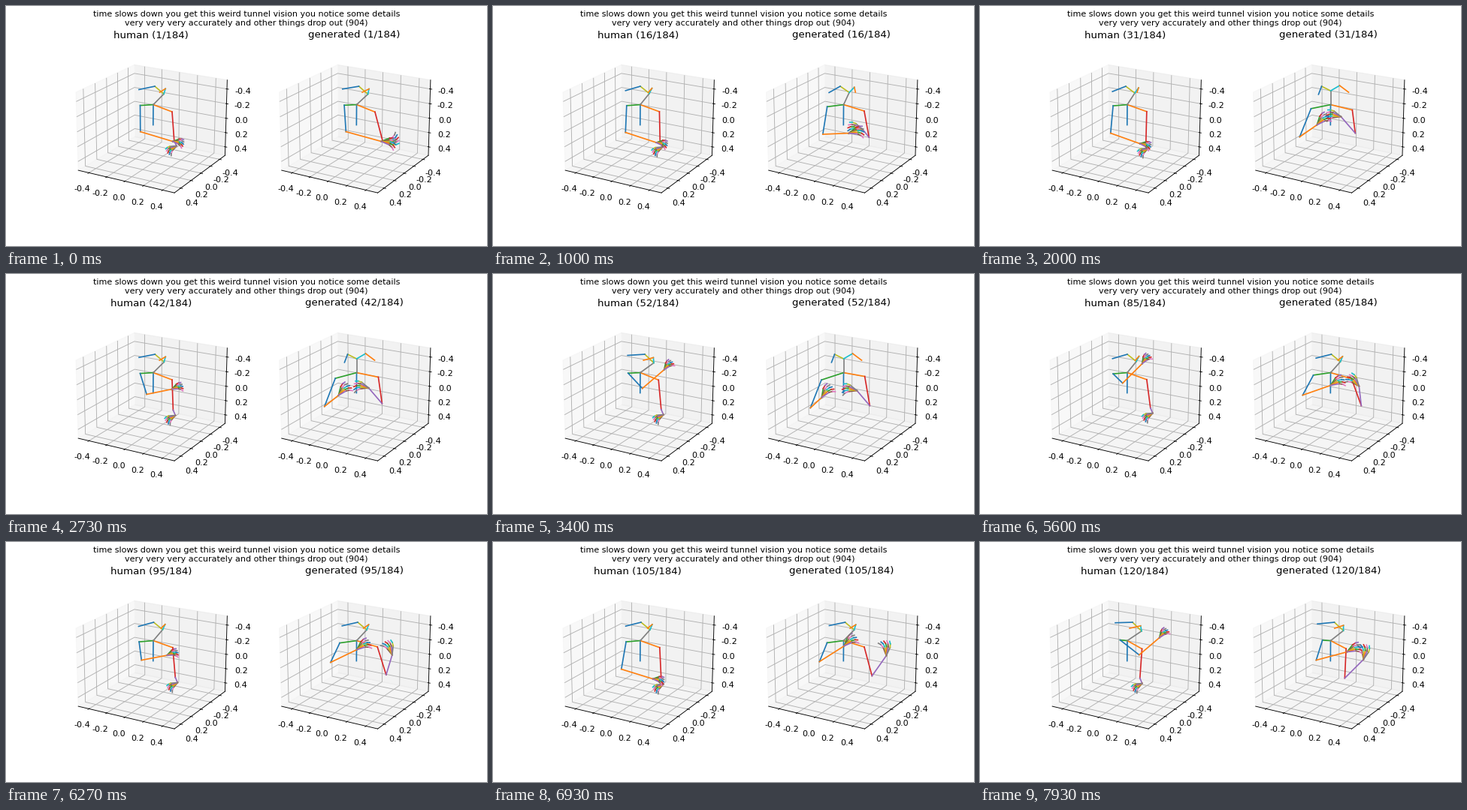
A matplotlib script for the animation above (8000 ms loop, 640 px wide and 320 px high).

```python
import numpy as np
import matplotlib.pyplot as plt
from matplotlib.animation import FuncAnimation

plt.rcParams["axes.unicode_minus"] = False

FRAMES, INTERVAL, TOTAL = 120, 66.6, 184   # about 15 fps, 8 s
ELEV, AZIM = 20, -60
LIM = 0.5 * 25 / 24
PX_PER_UNIT = 121.87                       # stage pixels per world unit in the view plane
WORLD = np.array([8 / 7, -8 / 7, -6 / 7])  # data to world scale, y and z flipped
KEYS = [0, 30, 51, 68, 84, 104, 119]       # frames at which a gesture is held
NECK = 0.2 - 27j


def hand_bones(wrist, first):
    """Five fingers of three bones each."""
    bones = []
    for j in range(first, first + 15, 3):
        bones += [(wrist, j), (j, j + 1), (j + 1, j + 2)]
    return bones


BONES = ([(0, 1), (1, 2), (1, 3), (2, 4), (4, 6)] + hand_bones(6, 8)
         + [(3, 5), (5, 7)] + hand_bones(7, 23)
         + [(1, 38), (38, 39), (38, 40), (39, 41), (40, 42)])
START, END = np.array(BONES).T

# One value per gesture: torso turn, head look, and arm joints as
# pixel offsets x + yj from the pelvis.
HUMAN = dict(
    turn=[0.53, 0.47, 0.58, 0.4, 0.47, 0.47, 0.83],
    look=[14, 10, 18, 6, 12, 13, 19],
    elbow_l=[-17 + 9j, -22 + 11j, 3 - 6j, -27 + 13j, -6 - 13j, -25 + 11j, 16 - 8j],
    wrist_l=[26 + 22j, 17 + 25j, 32 - 31j, 15 + 24j, 20 - 39j, 17 + 24j, 43 - 31j],
    elbow_r=[28 + 21j, 25 + 24j, 28 + 22j, 32 + 22j, 31 + 20j, 28 + 24j, 17 + 23j],
)
HUMAN["wrist_r"] = np.array(HUMAN["elbow_r"]) + (3 + 7j)
MODEL = dict(
    turn=[0.57, 0.1, -0.25, -0.1, 0.28, 0.33, 0.78],
    look=[15, 0, 0, 4, 13, 14, 17],
    elbow_l=[-14 + 9j, -41 + 16j, -44 + 20j, -44 + 17j, -37 + 3j, -32 + 1j, -19 - 1j],
    wrist_l=[33 + 22j, -18, -29 + 6j, -19 + 8j, -10j, 1 - 20j, 22 - 12j],
    elbow_r=[35 + 22j, 33 + 11j, 35 + 17j, 39 + 20j, 41 + 17j, 38 + 20j, 19 + 23j],
    wrist_r=[37 + 23j, 14 - 11j, 18 - 3j, 18 + 4j, 38 - 9j, 57 - 7j, 44 - 2j],
)


def gesture(i):
    """Eased position of frame i on the list of gestures."""
    n, t = divmod(np.interp(i, KEYS, range(len(KEYS))), 1)
    return n + t * t * (3 - 2 * t)


def shoulders(turn):
    far = turn + 0.42
    return (NECK + 29 * np.cos(turn) + 1j * (6.5 + 6 * np.sin(turn)),
            NECK - 30 * np.cos(far) + 1j * (12 - 13.5 * np.sin(far)))


def head(look):
    """Nose, two eyes and two ears of a head turned sideways by look pixels."""
    yaw = 0.18 + 0.07 * look
    nose = NECK + look + 1j * (0.3 * look - 18.5)
    eye_l = nose - 12 - 1j * (6 + 0.3 * look)
    eye_r = nose + 12 - 0.7 * look - 7j
    ear_l = eye_l - 23 * np.sin(yaw) + 11j * np.cos(yaw)
    ear_r = eye_r + 12 - 1.4 * look + 1j * (9 - 0.3 * look)
    return nose, eye_l, eye_r, ear_l, ear_r


def fingers(elbow, wrist, size, bend, curl):
    """Fan of curling fingers that continues the forearm."""
    palm = size * (wrist - elbow) / abs(wrist - elbow) * np.exp(1j * bend)
    joints = []
    for k in range(5):
        p, bone = wrist, palm * np.exp(0.2j * (k - 2))
        for scale in (1, 0.4, 0.3):
            p += scale * bone
            joints.append(p)
            bone *= np.exp(1j * curl)
    return joints


def lift(points):
    """Place view-plane pixel offsets in data space."""
    e, a = np.radians([ELEV, AZIM])
    right = np.array([-np.sin(a), np.cos(a), 0])
    up = np.array([-np.sin(e) * np.cos(a), -np.sin(e) * np.sin(a), np.cos(e)])
    p = np.array(points)[:, None] / PX_PER_UNIT
    return (p.real * right - p.imag * up) / WORLD


class Panel:
    def __init__(self, fig, slot, name, tracks, size, bend):
        self.name, self.tracks = name, tracks
        self.size, self.bend = size, bend
        self.ax = ax = fig.add_subplot(1, 2, slot, projection="3d")
        ax.view_init(elev=ELEV, azim=AZIM)
        self.lines = [ax.plot([0, 0], [0, 0], [0, 0], lw=1.5)[0] for _ in BONES]
        ax.set_xlim(-LIM, LIM)
        ax.set_ylim(LIM, -LIM)
        ax.set_zlim(LIM, -LIM)

    def pose(self, i):
        g = gesture(i)
        v = {k: np.interp(g, range(len(KEYS)), t) for k, t in self.tracks.items()}
        right, left = (v["elbow_r"], v["wrist_r"]), (v["elbow_l"], v["wrist_l"])
        return lift([0, NECK, *shoulders(v["turn"]),
                     right[0], left[0], right[1], left[1],
                     *fingers(*right, self.size, self.bend, -0.35),
                     *fingers(*left, self.size, -0.25, 0.35),
                     *head(v["look"])])

    def update(self, i):
        p = self.pose(i)
        for line, a, b in zip(self.lines, p[START], p[END]):
            line.set_data_3d(*np.transpose([a, b]))
        self.ax.set_title(f"{self.name} ({i + 1}/{TOTAL})")


fig = plt.figure(figsize=(8, 4), dpi=80)
fig.suptitle("time slows down you get this weird tunnel vision you notice some details\n"
             "very very very accurately and other things drop out (904)", fontsize=10)
panels = [Panel(fig, 1, "human", HUMAN, size=9, bend=1.5),
          Panel(fig, 2, "generated", MODEL, size=12, bend=-0.58)]


def draw(i):
    for panel in panels:
        panel.update(i)


anim = FuncAnimation(fig, draw, frames=FRAMES, interval=INTERVAL,
                     init_func=lambda: draw(0), repeat=True, repeat_delay=0)
plt.show()
```
